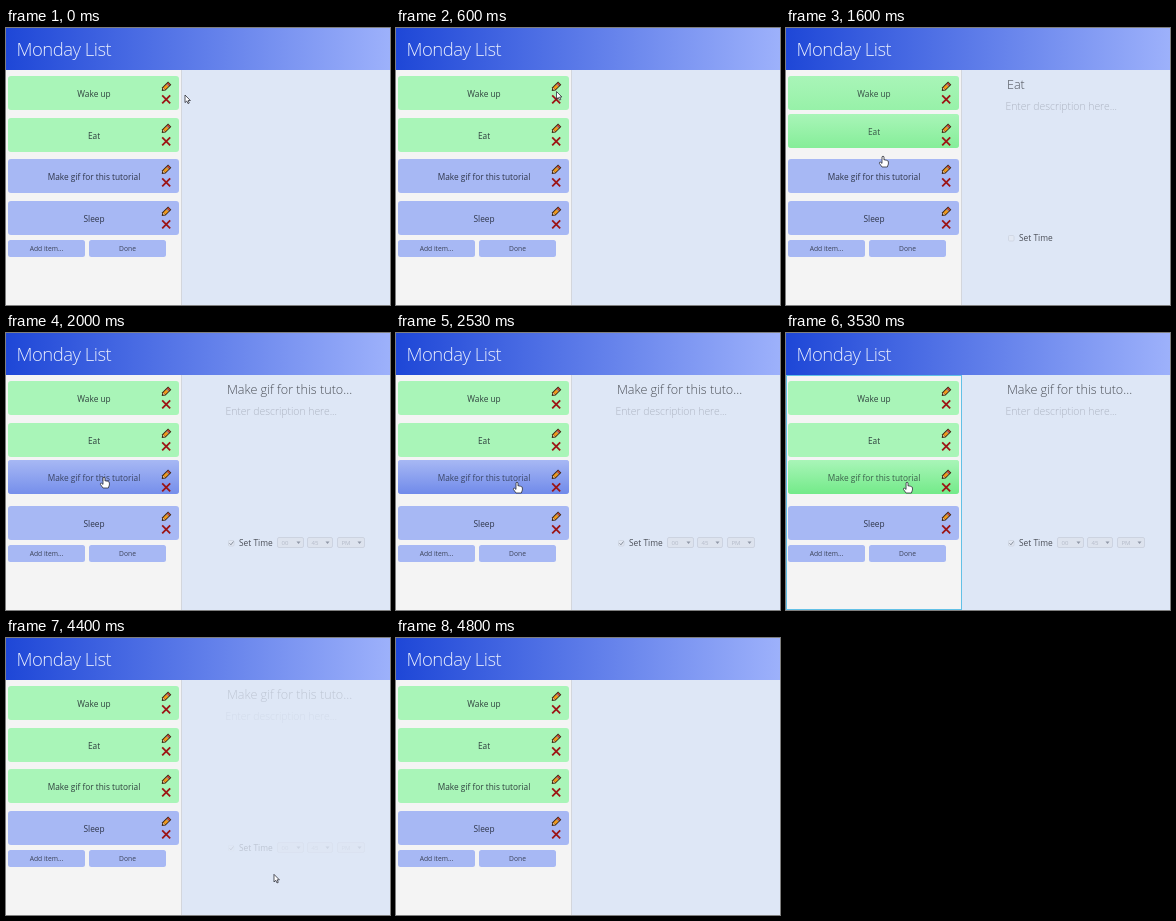
These frames come from a looping animation (384 px wide and 277 px high, 4990 ms). An HTML page with a canvas:

```html
<!DOCTYPE html>
<html lang="en">
<head>
<meta charset="utf-8">
<title>Monday List</title>
<style>
  html, body { margin: 0; width: 100%; height: 100%; overflow: hidden; background: #dee7f6; }
  canvas { display: block; }
</style>
</head>
<body>
<canvas id="stage" width="384" height="277"></canvas>
<script>
const ctx = document.getElementById('stage').getContext('2d');
const LOOP = 4990;
const FPS = 15;
const GREEN = ['#a9f5b8', '#73ea89'];
const BLUE = ['#a7b8f4', '#708aea'];

// Hover windows in ms; "done" is when the item turns green.
const items = [
  { label: 'Wake up', done: 0, enter: 800, leave: 1400 },
  { label: 'Eat', done: 0, enter: 1400, leave: 1660 },
  { label: 'Make gif for this tutorial', done: 3520, enter: 1730, leave: 3860 },
  { label: 'Sleep', done: Infinity, enter: Infinity, leave: Infinity }
];

// Pointer tip: time, x, y
const path = [
  [400, 179, 67], [800, 142, 60], [1067, 112, 58], [1333, 106, 84],
  [1600, 97, 128], [2000, 98, 144], [2400, 98, 144], [2533, 121, 149],
  [3533, 121, 149], [3867, 182, 168], [4000, 225, 185], [4300, 262, 220],
  [4667, 284, 280]
];

const clamp = v => Math.max(0, Math.min(1, v));
const ramp = (t, from, span) => clamp((t - from) / span);

function pointerAt(t) {
  let a = path[0];
  for (const b of path) {
    if (t < b[0]) {
      const k = b === a ? 0 : ramp(t, a[0], b[0] - a[0]);
      return [a[1] + (b[1] - a[1]) * k, a[2] + (b[2] - a[2]) * k];
    }
    a = b;
  }
  return [a[1], a[2]];
}

function text(str, x, y, size, color, { weight = 400, align = 'left', spacing = 0 } = {}) {
  ctx.font = `${weight} ${size}px "Open Sans", "Noto Sans", sans-serif`;
  ctx.letterSpacing = spacing + 'px';
  ctx.textAlign = align;
  ctx.fillStyle = color;
  ctx.fillText(str, x, y);
}

function box(x, y, w, h, r, fill, stroke) {
  ctx.beginPath();
  ctx.roundRect(x, y, w, h, r);
  ctx.fillStyle = fill;
  ctx.fill();
  if (stroke) {
    ctx.strokeStyle = stroke;
    ctx.lineWidth = 0.8;
    ctx.stroke();
  }
}

function line(color, width, ...points) {
  ctx.beginPath();
  points.forEach(([x, y]) => ctx.lineTo(x, y));
  ctx.strokeStyle = color;
  ctx.lineWidth = width;
  ctx.stroke();
}

function pencil(x, y) {
  ctx.save();
  ctx.translate(x, y);
  ctx.rotate(-Math.PI / 4);
  ctx.fillStyle = '#3c2410';
  ctx.beginPath();
  ctx.moveTo(-6, 0);
  ctx.lineTo(-3, -2.3);
  ctx.lineTo(5.2, -2.3);
  ctx.lineTo(5.2, 2.3);
  ctx.lineTo(-3, 2.3);
  ctx.fill();
  ctx.fillStyle = '#ecc99a';
  ctx.fillRect(-3.8, -1, 1.4, 2);
  ctx.fillStyle = '#f19a1c';
  ctx.fillRect(-2.4, -1.4, 4.4, 2.8);
  ctx.fillStyle = '#b9b9b9';
  ctx.fillRect(2, -1.4, 0.9, 2.8);
  ctx.fillStyle = '#c8402f';
  ctx.fillRect(2.9, -1.4, 1.7, 2.8);
  ctx.restore();
}

function cross(x, y) {
  const r = 4;
  line('#9c1414', 1.8, [x - r, y - r], [x + r, y + r]);
  line('#9c1414', 1.8, [x + r, y - r], [x - r, y + r]);
}

function header() {
  const g = ctx.createLinearGradient(0, 0, 384, 0);
  g.addColorStop(0, '#1e47d7');
  g.addColorStop(1, '#9db1fb');
  ctx.fillStyle = g;
  ctx.fillRect(0, 0, 384, 42);
  text('Monday List', 10.5, 28, 18.5, '#e8edfd', { weight: 300, spacing: -0.5 });
}

function item(it, i, t) {
  const top = Math.round(48.3 + 41.5 * i);
  const over = t >= it.enter && t < it.leave;
  const y = over ? top - 4 : top;
  const glow = ramp(t, it.enter, 300) * (1 - ramp(t, it.leave, 300));
  const [base, deep] = t >= it.done ? GREEN : BLUE;
  box(2, y, 171, 34, 3, base);
  if (glow > 0) {
    const g = ctx.createLinearGradient(0, y, 0, y + 34);
    g.addColorStop(0, base);
    g.addColorStop(1, deep);
    ctx.globalAlpha = glow;
    box(2, y, 171, 34, 3, g);
    ctx.globalAlpha = 1;
  }
  text(it.label, 88, y + 21, 8.3, `rgba(20,25,35,${0.82 - 0.15 * glow})`, { align: 'center' });
  pencil(160, top + 10.8);
  cross(160.2, top + 23.3);
}

function button(label, x) {
  box(x, 212, 77, 17, 2.5, BLUE[0]);
  text(label, x + 38.5, 223, 6.7, '#3b4258', { align: 'center' });
}

function list(t) {
  ctx.fillStyle = '#f4f4f4';
  ctx.fillRect(0, 42, 175, 235);
  ctx.fillStyle = '#d3d6dc';
  ctx.fillRect(175, 42, 1, 235);
  items.forEach((it, i) => item(it, i, t));
  button('Add item...', 2);
  button('Done', 83);
  if (t >= 3520 && t < 3860) {
    ctx.strokeStyle = '#62c0e6';
    ctx.lineWidth = 1;
    ctx.strokeRect(0.5, 42.5, 175, 234);
  }
}

function select(label, x, w) {
  box(x, 204.5, w, 10, 1.5, '#dde3ee', '#c8cfdc');
  text(label, x + 4, 212, 6, '#b3bac8');
  ctx.fillStyle = '#8f97a6';
  ctx.beginPath();
  ctx.moveTo(x + w - 7, 208.5);
  ctx.lineTo(x + w - 3, 208.5);
  ctx.lineTo(x + w - 5, 211);
  ctx.fill();
}

function details(t) {
  ctx.globalAlpha = ramp(t, 800, 540) * (1 - ramp(t, 3930, 600));
  if (!ctx.globalAlpha) {
    ctx.globalAlpha = 1;
    return;
  }
  const timed = t >= 1730;
  const title = timed ? 'Make gif for this tuto...' : t >= 1400 ? 'Eat' : 'Wake up';
  text(title, 221, 60.5, 12.6, '#4c5058', { weight: 300 });
  text('Enter description here...', 219.5, 82, 10.4, '#adb4c2', { weight: 300 });
  box(222.5, 207.5, 5.5, 5.5, 1, '#e2e8f3', '#ccd3e0');
  text('Set Time', 233, 213.2, 8.4, '#4a4e57');
  if (timed) {
    line('#858c99', 1, [223.5, 210.3], [224.9, 211.8], [227.5, 208.5]);
    select('00', 271.5, 26);
    select('45', 301.5, 25);
    select('PM', 331.5, 27);
  }
  ctx.globalAlpha = 1;
}

const arrowShape = new Path2D('M0 0V7.6L1.8 6L3 8.6L4.3 8L3.1 5.5H5.4Z');
const handShape = new Path2D(
  'M-1 .8Q0-.6 1 .8V4Q2 3.3 2.8 4.2Q3.8 3.8 4.3 4.8Q5.4 4.6 5.4 5.8V8L4.3 11H-1L-3.6 7.4Q-3.8 5.8-2.4 6.2L-1 7.4Z');

function pointer(t) {
  const [x, y] = pointerAt(t);
  ctx.save();
  ctx.translate(x, y);
  if (t >= 3930 && t < 4190) {
    line('#222', 0.9, [0, -3.5], [0, 3.5]);
    line('#222', 0.9, [-1.7, -3.8], [1.7, -3.8]);
    line('#222', 0.9, [-1.7, 3.8], [1.7, 3.8]);
  } else {
    const shape = t >= 800 && t < 3860 ? handShape : arrowShape;
    ctx.fillStyle = '#fff';
    ctx.strokeStyle = '#2b2e38';
    ctx.lineWidth = 0.8;
    ctx.fill(shape);
    ctx.stroke(shape);
  }
  ctx.restore();
}

function draw(now) {
  const elapsed = now % LOOP;
  const t = Math.floor((elapsed + 4) * FPS / 1000) * 1000 / FPS;
  ctx.fillStyle = '#dee7f6';
  ctx.fillRect(0, 0, 384, 277);
  header();
  list(t);
  details(t);
  pointer(t);
  requestAnimationFrame(draw);
}

requestAnimationFrame(draw);
</script>
</body>
</html>
```
